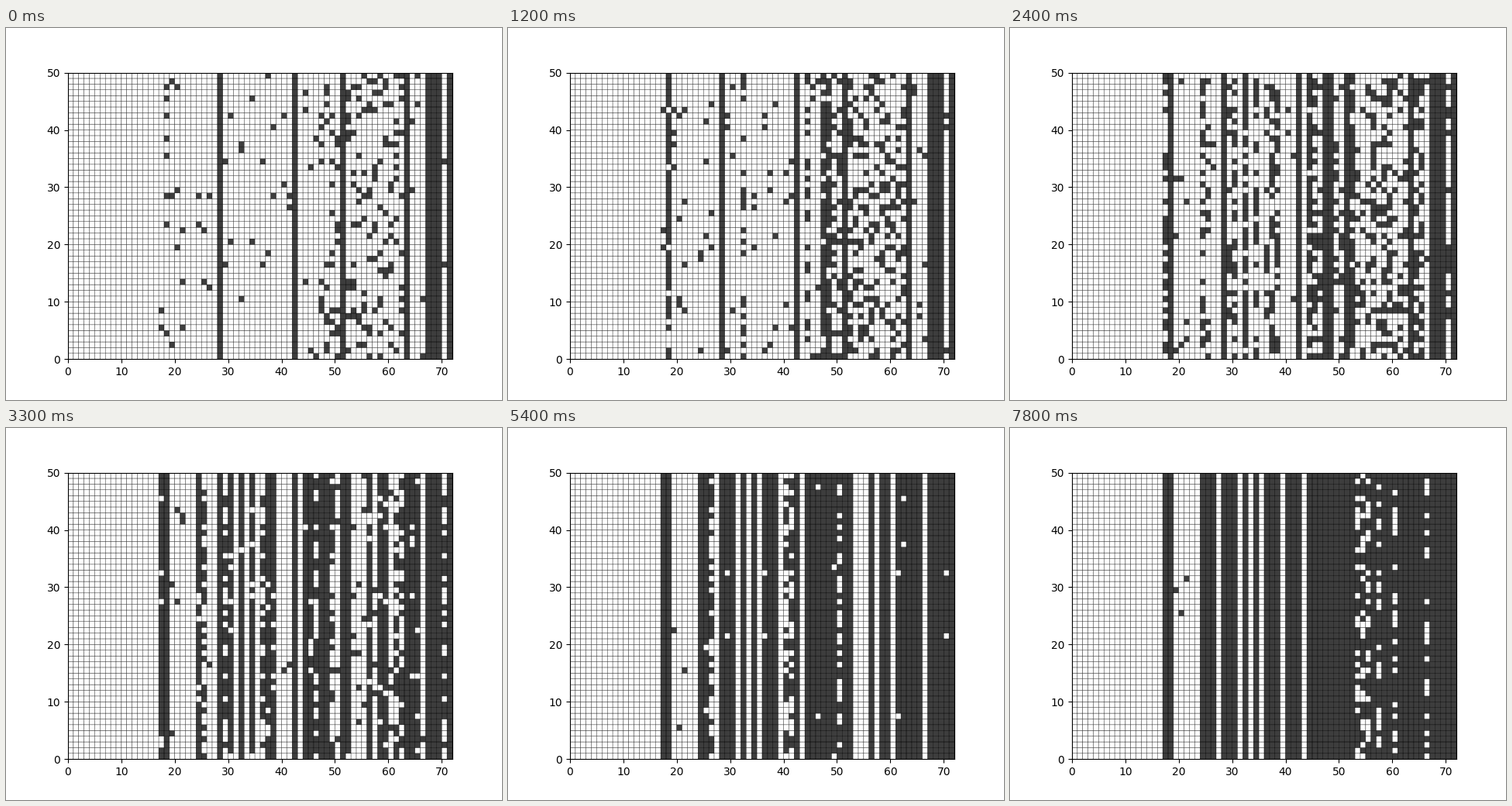
Animation, 640 px wide and 480 px high, one loop 8 s. Source, as a matplotlib script:

```python
import matplotlib.pyplot as plt
import numpy as np
from matplotlib.animation import FuncAnimation

ROWS, COLS = 50, 72
TICK_MS, TICKS_PER_STEP, TICKS = 100, 3, 80
INK_ALPHA = 0.76

FOUNDERS = [28, 42, 51, 63, 67, 68, 69, 71]

# Waves of takeover: middle step, length in steps, columns that turn dark.
WAVES = [
    (2, 8, [18, 47, 48]),
    (5, 14, [32, 44, 52]),
    (8, 10, [17, 24, 30, 34, 37, 38, 45, 56, 58, 59, 64, 65]),
    (11, 18, [25, 29, 36, 46, 49, 61, 62, 70]),
    (18, 16, [26, 40, 41, 50]),
    (25, 14, [53, 54, 55, 57, 60, 66]),
]

# Columns inherited together.
LINKED = {36: 29, 70: 29, 50: 46}


def ease(x):
    x = np.clip(x, 0, 1)
    return x * x * (3 - 2 * x)


def dark_share(step):
    """Share of dark cells in each column: early drift, then takeover."""
    drift = np.exp(-((step - 4) / 6) ** 2)
    share = np.zeros(COLS)
    share[19:22] = 0.02 + 0.05 * drift
    for middle, length, cols in WAVES:
        share[cols] = ease((step - middle) / length + 0.5)
        for col in cols:
            neutral = 0.3 if 48 <= col <= 62 else 0.06
            share[col] = max(share[col], neutral * drift)
    share[FOUNDERS] = 1
    return share


def population(step):
    rng = np.random.default_rng(100 + step)
    luck = rng.permuted(np.tile(np.arange(ROWS)[:, None], COLS), axis=0)
    for col, partner in LINKED.items():
        luck[:, col] = luck[:, partner]
    return (luck < np.round(ROWS * dark_share(step))).astype(int)


fig, ax = plt.subplots(figsize=(6.4, 4.8), dpi=100)
cells = ax.pcolor(population(0), cmap="binary", vmin=0, vmax=1,
                  edgecolors="black", linewidths=0.3, alpha=INK_ALPHA)
ax.set_xlim(0, COLS)
ax.set_ylim(0, ROWS)


def update(tick):
    cells.set_array(population(tick // TICKS_PER_STEP).ravel())
    return [cells]


anim = FuncAnimation(fig, update, frames=TICKS, interval=TICK_MS,
                     repeat=True, repeat_delay=0)
plt.show()
```
